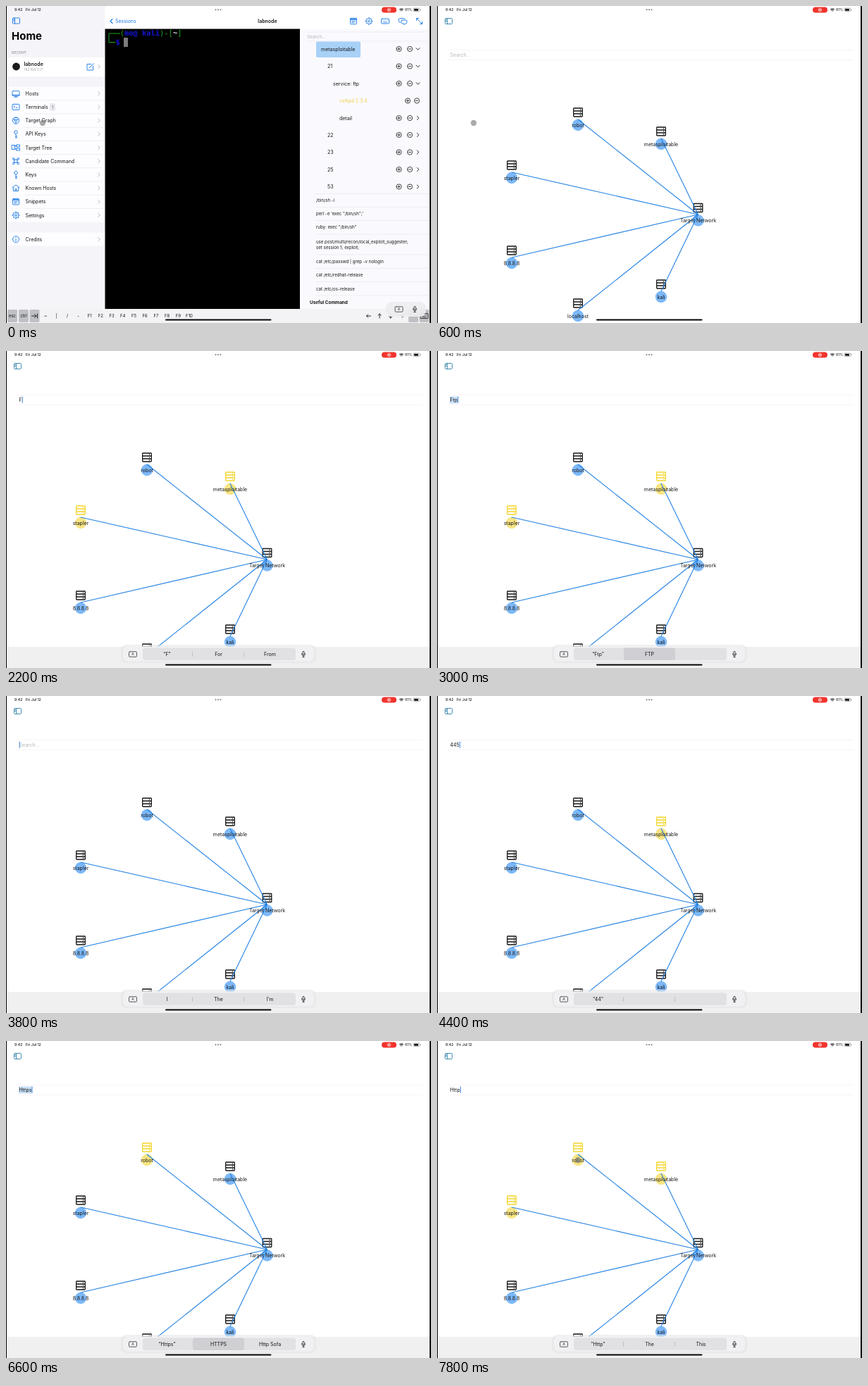
An HTML page that plays this animation: 603x450 px, repeating every 8000 ms.

```html
<!DOCTYPE html>
<html lang="en">
<head>
<meta charset="utf-8">
<title>Target graph search</title>
<style>
html, body { margin: 0; width: 100%; height: 100%; overflow: hidden; background: #fff; }
svg { display: block; width: 100vw; height: 100vh; font-family: Inter, "Open Sans", sans-serif; }
text { white-space: pre; }
</style>
</head>
<body>
<svg id="stage" viewBox="0 0 603 450" preserveAspectRatio="none"></svg>
<script>
const LOOP = 8000, STEP = 200;
const INK = '#161616', BLUE = '#1979e6', GREY = '#a9a9af', YELLOW = '#f3d62f';

const text = (x, y, s, size = 7, fill = INK, more = '') =>
  `<text x="${x}" y="${y + size * .36}" font-size="${size}" fill="${fill}" ${more}>${s}</text>`;
const mid = (x, y, s, size = 7, fill = INK, more = '') =>
  text(x, y, s, size, fill, 'text-anchor="middle" ' + more);
const rect = (x, y, w, h, fill, r = 0, more = '') =>
  `<rect x="${x}" y="${y}" width="${w}" height="${h}" rx="${r}" fill="${fill}" ${more}/>`;
const path = (x, y, d, color = INK, w = .9) =>
  `<path transform="translate(${x} ${y})" d="${d}" fill="none" stroke="${color}" stroke-width="${w}" stroke-linecap="round" stroke-linejoin="round"/>`;
const hline = (x1, x2, y, color = '#e3e2e8') => path(x1, y, `M0 0H${x2 - x1}`, color, .6);
const ring = r => `M${-r} 0a${r} ${r} 0 1 0 ${2 * r} 0a${r} ${r} 0 1 0 ${-2 * r} 0`;
const box = (w, h, r = 1) =>
  `M${-w / 2 + r} ${-h / 2}h${w - 2 * r}q${r} 0 ${r} ${r}v${h - 2 * r}q0 ${r} ${-r} ${r}h${2 * r - w}q${-r} 0 ${-r} ${-r}v${2 * r - h}q0 ${-r} ${r} ${-r}`;

const ICON = {
  panel: box(10, 8) + 'M-2 -4V4M-4 -2h1M-4 0h1',
  hosts: box(10, 7) + 'M-5 2H5M0 3.5V5M-2 5H2',
  terminal: box(10, 8) + 'M-3 -2l1.5 1.2l-1.5 1.2M0 1H2',
  graph: ring(4.6) + ring(1.6) + 'M-4 -2L-1 -1M4 -2L1 -1M0 1.6V4.6M-2 -4L2 -4',
  key: 'M-2.3 -2.6a2.3 2.3 0 1 0 4.6 0a2.3 2.3 0 1 0 -4.6 0M0 0V5.5M0 3H1.5M0 5H1.5',
  tree: 'M-5.5 -3.5h4v6h-4zM1 -4h4.5v3h-4.5zM1 1h4.5v3h-4.5zM-1.5 -2.5H1M-1.5 2H1',
  command: 'M-2 -2H2V2H-2zM-2 -2v-1.2a1.3 1.3 0 1 0 -1.3 1.2zM2 -2v-1.2a1.3 1.3 0 1 1 1.3 1.2zM-2 2v1.2a1.3 1.3 0 1 1 -1.3 -1.2zM2 2v1.2a1.3 1.3 0 1 0 1.3 -1.2z',
  known: 'M-5 -1L0 -4.5L5 -1M-3.7 -1V4H3.7V-1M-1 4V1H1V4',
  snippet: box(9, 8.5) + 'M-4.5 -2.2H4.5M-4.5 -3H4.5M-2.5 0H2.5M-2.5 2H1',
  gear: ring(4) + ring(1.5) + 'M0 -5.2V-4M0 4V5.2M-5.2 0H-4M4 0H5.2M-3.7 -3.7L-2.9 -2.9M3.7 3.7L2.9 2.9M-3.7 3.7L-2.9 2.9M3.7 -3.7L2.9 -2.9',
  info: ring(4.5) + 'M0 -.5V2.3M0 -2.3V-2.2',
  keyboard: box(11, 7) + 'M-3.5 -1.3h.1M-1.2 -1.3h.1M1.2 -1.3h.1M3.5 -1.3h.1M-2.5 1.4H2.5',
  chat: 'M-3 1.5h-1.5q-1.2 0 -1.2 -1.2v-3q0 -1.2 1.2 -1.2h6q1.2 0 1.2 1.2M-1.5 -1.5h6q1.2 0 1.2 1.2v2.6q0 1.2 -1.2 1.2h-1l-1.5 1.6v-1.6h-2.5q-1.2 0 -1.2 -1.2z',
  expand: 'M-4 -1V-4H-1M-4 -4L4 4M4 1V4H1',
  edit: 'M1.5 -4H-4.5V4.5H4V-1M-1.5 1.5L5 -4.8',
  plus: ring(3.6) + 'M-1.7 0H1.7M0 -1.7V1.7',
  minus: ring(3.6) + 'M-1.7 0H1.7',
  right: 'M-1.3 -2.5L1.3 0L-1.3 2.5',
  down: 'M-2.5 -1.3L0 1.3L2.5 -1.3',
  mic: 'M-1.2 -3a1.2 1.2 0 0 1 2.4 0v2.5a1.2 1.2 0 0 1 -2.4 0zM-2.4 -1v.6a2.4 2.4 0 0 0 4.8 0v-.6M0 2V4M-1.2 4H1.2',
  left: 'M1.5 -3L-1.5 0L1.5 3',
  server: 'M-5.5 -6h11q.8 0 .8 .8v10.4q0 .8 -.8 .8h-11q-.8 0 -.8 -.8v-10.4q0 -.8 .8 -.8M-6 -2H6M-6 2H6M3.4 -4h.1M3.4 0h.1M3.4 4h.1'
};
const icon = (name, x, y, color = BLUE, w = .9) => path(x, y, ICON[name], color, w);

const statusBar = () =>
  text(12, 5, '9:42', 5.2, INK, 'font-weight="500"') + text(28, 5, 'Fri Jul 12', 5.2, INK, 'font-weight="500"') +
  [297.5, 301, 304.5].map(x => `<circle cx="${x}" cy="5.3" r="1" fill="#777"/>`).join('') +
  rect(533, 1.5, 21, 8, '#f0342d', 4) + path(543.5, 5.5, ring(2.2), '#fff', .7) +
  '<circle cx="543.5" cy="5.5" r="1" fill="#fff"/>' +
  path(561, 7, 'M-2.6 -2.4Q0 -4.6 2.6 -2.4M-1.5 -1.1Q0 -2.4 1.5 -1.1M0 .1V.2', INK, 1) +
  text(566, 5, '81%', 5.2) + path(582.5, 5.3, box(9, 4.4, 1.2), '#777', .6) +
  rect(579, 3.9, 6, 2.8, INK, .6) + rect(587.6, 4.5, .8, 1.6, '#777');

const homeBar = rect(226, 444.4, 150.5, 2.2, '#050505', 1.1);
const edges = rect(0, 0, 1, 450, '#000') + rect(601, 0, 2, 450, '#000');
const inputKey = (x, y) => path(x, y, box(11, 7.4, 1.4), '#333', .8) + mid(x, y, 'A', 5, '#333');

function sidebar() {
  const items = [['hosts', 'Hosts'], ['terminal', 'Terminals'], ['graph', 'Target Graph'], ['key', 'API Keys'],
    ['tree', 'Target Tree'], ['command', 'Candidate Command'], ['key', 'Keys'], ['known', 'Known Hosts'],
    ['snippet', 'Snippets'], ['gear', 'Settings']];
  let s = rect(1, 0, 139.5, 430, '#f5f4f9') + rect(1, 73, 139.5, 27, '#fff') +
    rect(1, 114.5, 139.5, 192, '#fdfdff') + rect(1, 321.5, 139.5, 19, '#fdfdff') +
    '<g id="press"></g>' + icon('panel', 14.5, 21) +
    text(8, 43, 'Home', 15, '#050505', 'font-weight="700"') + text(8, 66, 'RECENT', 5.4, '#88888e') +
    '<circle cx="14.5" cy="86" r="5.4" fill="#1c1c1c"/>' +
    text(25.5, 82, 'labnode', 7, INK, 'font-weight="600"') + text(25.5, 90, '192.168.11.17', 4.8, '#a5a5aa') +
    icon('edit', 119.5, 86.5) + icon('right', 132, 86, GREY);
  items.forEach(([name, label], i) => {
    const y = 124.2 + i * 19.2;
    s += icon(name, 14, y) + text(27.5, y, label) + icon('right', 132, y, GREY, .8);
    if (i < 9) s += hline(27, 140, y + 9.6);
  });
  return s + rect(62, 138, 8, 11, '#e9e8ee', 2) + mid(66, 143.5, '1', 6.4, '#777') +
    icon('info', 14, 331.2) + text(27.5, 331.2, 'Credits') + icon('right', 132, 331.2, GREY, .8);
}

function terminal() {
  const mono = 'font-family="DejaVu Sans Mono, monospace"', bold = mono + ' font-weight="700"';
  const green = '#1fa51f', blue = '#1414d2', put = (col, s, c, f = mono) => text(143 + col * 6.26, 38.6, s, 10.4, c, f);
  return rect(140.5, 10, 276.5, 22.5, '#fff') + icon('left', 149.5, 21.5, BLUE, 1.1) + text(155, 21.5, 'Sessions', 7, BLUE) +
    mid(371, 21.5, 'labnode', 7, INK, 'font-weight="600"') + rect(140.5, 32.5, 276.5, 397.5, '#000') +
    path(146, 39, 'M15.5 0H0V12.5H9', green, 1) + put(3, '(', green) + put(4, 'mo@', blue, bold) +
    put(8, 'kali', blue, bold) + put(12, ')-[', green) + put(15, '~', '#eee', bold) + put(16, ']', green) +
    text(155.5, 51.2, '$', 10.4, blue, bold) + rect(167, 45, 6, 13, '#7c7c7c');
}

function targets() {
  const rows = [['metasploitable', 447, 61, 'down'], ['21', 456, 85.5, 'down'], ['service: ftp', 464, 110, 'down'],
    ['vsftpd 2.3.4', 473, 134.5], ['detail', 473, 159, 'right'], ['22', 456, 183, 'right'],
    ['23', 456, 207.5, 'right'], ['25', 456, 232, 'right'], ['53', 456, 256.5, 'right']];
  const commands = [[276, '/bin/sh -i'], [295, "perl -e 'exec \"/bin/sh\";'"], [314, 'ruby: exec "/bin/sh"'],
    [334.5, 'use post/multi/recon/local_exploit_suggester;'], [343, 'set session 1; exploit;'],
    [363, 'cat /etc/passwd | grep -v nologin'], [382, 'cat /etc/redhat-release'], [401.5, 'cat /etc/os-release']];
  let s = rect(417, 10, 184, 420, '#faf9fd') + rect(417, 10, 184, 22.5, '#fff') +
    ['snippet', 'gear', 'keyboard', 'chat', 'expand'].map((n, i) => icon(n, [493, 515, 538, 563, 586.5][i], 21.5)).join('') +
    text(427, 43.5, 'Search...', 6.4, '#b4b4ba') + hline(427, 596, 37) + hline(427, 596, 50) +
    rect(440, 50.5, 63, 22.5, '#a8d1f7', 2);
  for (const [label, x, y, arrow] of rows) {
    s += text(x, y, label, 7, arrow ? INK : '#ead04c');
    s += icon('plus', arrow ? 557.5 : 570, y, INK, .8) + icon('minus', arrow ? 573 : 583, y, INK, .8);
    if (arrow) s += icon(arrow, 584.5, y, INK);
  }
  for (const [y, label] of commands) s += text(440, y, label, 6.1);
  for (const y of [266.5, 285.5, 304.5, 324, 353, 372.5, 391.5, 411]) s += hline(440, 601, y);
  return s + text(431, 421, 'Useful Command', 6.4, INK, 'font-weight="700"');
}

function keyRow() {
  let s = rect(1, 430, 600, 20, '#f3f3f5');
  for (const x of [2, 18, 33.5, 571, 586.5]) s += rect(x, 431, 14, 18, '#bfc0c4', 2);
  s += mid(9, 440, 'esc', 6) + mid(25, 440, 'ctrl', 6) + path(40.5, 440, 'M-4 0H2.5M0 -2.5L2.5 0L0 2.5M4 -3V3');
  ['~', '|', '/', '-'].forEach((k, i) => s += mid(56 + i * 15.5, 440, k, 6.4));
  for (let i = 1; i <= 10; i++) s += mid(103 + i * 15.7, 440, 'F' + i, 6);
  [180, 270, 90, 0].forEach((a, i) => s += `<g transform="translate(${514.5 + i * 15.6} 440) rotate(${a})">` +
    path(0, 0, 'M-3 0H3M.8 -2.2L3 0L.8 2.2') + '</g>');
  return s + icon('keyboard', 593.5, 440, INK, .8) + rect(539, 420, 57, 21, '#ededf0', 9, 'fill-opacity=".92"') +
    inputKey(557.5, 430.5) + icon('mic', 580, 430.5, '#333');
}

const NODES = [['robot', 200, 169], ['metasploitable', 318, 196], ['stapler', 106, 244],
  ['8.8.8.8', 106, 365], ['localhost', 200, 440], ['kali', 318, 413], ['Target Network', 370.5, 304.5]];
const HUB = NODES[6];

function network(hits) {
  let s = '';
  for (const [name, x, y] of NODES) {
    const hit = hits.includes(name);
    s += `<circle cx="${x}" cy="${y}" r="8.2" fill="${hit ? '#f8e583' : '#7cb8f8'}"/>` +
      icon('server', x, y - 18, hit ? YELLOW : INK, 1.3);
  }
  for (const [, x, y] of NODES.slice(0, 6))
    s += path(0, 0, `M${x} ${y - 8}L${HUB[1]} ${HUB[2] - 8.5}`, '#2583e3', 1.1);
  for (const [name, x, y] of NODES) s += mid(x, y, name);
  return s;
}

function wordBar(words, picked) {
  let s = rect(1, 420, 600, 30, '#f0f0f1') + rect(163, 417, 277, 26, '#e3e3e5', 8, 'fill-opacity=".55"') +
    rect(166, 419.5, 271, 21, '#f1f1f3', 7) + rect(194, 421.5, 217, 17.5, '#e1e1e4', 4);
  if (picked) s += rect(265, 421.5, 73, 17.5, '#cfcfd4', 3);
  else s += [264.5, 337.5].map(x => path(x, 427.5, 'M0 0V6', '#b8b8bd', .8)).join('');
  words.forEach((w, i) => s += mid(228.5 + i * 73, 430.5, w, 7));
  return s + inputKey(180, 430.5) + icon('mic', 422, 430.5, '#333');
}

// Ports and services that answer each query
const WEB = ['robot', 'metasploitable', 'stapler'], FTP = ['metasploitable', 'stapler'];
const TYPING = [
  [1600, '', [], ['I', 'The', 'I’m']],
  [2200, 'F', FTP, ['“F”', 'For', 'From']],
  [2400, 'Ft', FTP, ['“Ft”', 'FT', '']],
  [2600, 'Ftp', FTP, ['“Ftp”', 'FTP', ''], true],
  [3400, 'Ft', FTP, ['“Ft”', 'FT', '']],
  [3600, '', [], ['I', 'The', 'I’m']],
  [4000, '4', ['robot', 'metasploitable'], ['“4”', '', '']],
  [4200, '44', ['robot', 'metasploitable'], ['“44”', '', '']],
  [4400, '445', ['metasploitable'], ['“44”', '', '']],
  [4600, '445', ['metasploitable'], ['“445”', '', '']],
  [5000, '4', ['robot', 'metasploitable'], ['“4”', '', '']],
  [5200, '', [], ['I', 'The', 'I’m']],
  [5400, 'H', WEB, ['“H”', 'He', 'How']],
  [5600, 'Ht', WEB, ['“Ht”', 'HT', '']],
  [5800, 'Htt', WEB, ['“Htt”', 'HTTP', '']],
  [6000, 'Http', WEB, ['“Http”', 'HTTP', ''], true],
  [6400, 'Https', ['robot'], ['“Https”', 'HTTPS', 'Http Sofa'], true],
  [7200, 'Http', WEB, ['“Http”', 'The', 'This']]
];

// Pointer: time, x, y; it vanishes after each gap
const TRACKS = [
  [[0, 52, 166], [600, 52, 166], [1200, 116, 252], [1600, 62, 72], [1800, 62, 72]],
  [[7600, 170, 215], [7800, 200, 169], [8000, 200, 169]]
];
function pointer(t) {
  for (const track of TRACKS)
    for (let i = 1; i < track.length; i++) {
      const [t0, x0, y0] = track[i - 1], [t1, x1, y1] = track[i];
      if (t < t0 || t >= t1) continue;
      const k = (t - t0) / (t1 - t0), e = k * k * (3 - 2 * k);
      return `<circle cx="${x0 + (x1 - x0) * e}" cy="${y0 + (y1 - y0) * e}" r="4.2" fill="#777" fill-opacity=".62"/>`;
    }
  return '';
}

const stage = document.getElementById('stage');
stage.innerHTML = rect(0, 0, 603, 450, '#fff') +
  `<g id="home">${sidebar() + terminal() + targets() + keyRow()}</g>` +
  `<g id="graph">${icon('panel', 16.5, 21.5, '#2f7fa8') + hline(15, 590, 62.5, '#faeaf0') + hline(15, 590, 76.5, '#faeaf0')}` +
  '<g id="net"></g><rect id="mark" x="18" y="64.5" height="10" fill="#c9dff5"/>' +
  text(18.5, 69.5, '', 7, INK, 'id="query"') + rect(0, 64.5, .9, 9.5, '#2d7fe0', 0, 'id="caret"') +
  '<g id="bar"></g></g>' + statusBar() + homeBar + '<g id="dot"></g>' + edges;
const $ = id => document.getElementById(id);
const show = (id, on) => $(id).setAttribute('display', on ? 'inline' : 'none');

function draw(t) {
  const inGraph = t >= 600;
  show('home', !inGraph);
  show('graph', inGraph);
  $('dot').innerHTML = pointer(t);
  $('press').innerHTML = t >= 400 ? rect(1, 153, 139.5, 19.2, '#dcdce1') : '';
  if (!inGraph) return;

  const state = TYPING.filter(s => s[0] <= t).pop();
  const [, query, hits, words, picked] = state || [0, '', []];
  $('net').innerHTML = network(hits);
  $('query').textContent = query || 'Search...';
  $('query').setAttribute('fill', query ? INK : '#b9b7bd');
  const end = 18.5 + (query ? $('query').getComputedTextLength() : 0);
  $('mark').setAttribute('width', end - 17.5);
  show('mark', picked);
  $('caret').setAttribute('x', end + .2);
  show('caret', state);
  $('bar').innerHTML = state ? wordBar(words, picked) : '';
}

let start, last;
function tick(now) {
  start ??= now;
  const t = Math.floor((now - start) % LOOP / STEP) * STEP;
  if (t !== last) draw(last = t);
  requestAnimationFrame(tick);
}
draw(0);
requestAnimationFrame(tick);
</script>
</body>
</html>
```
